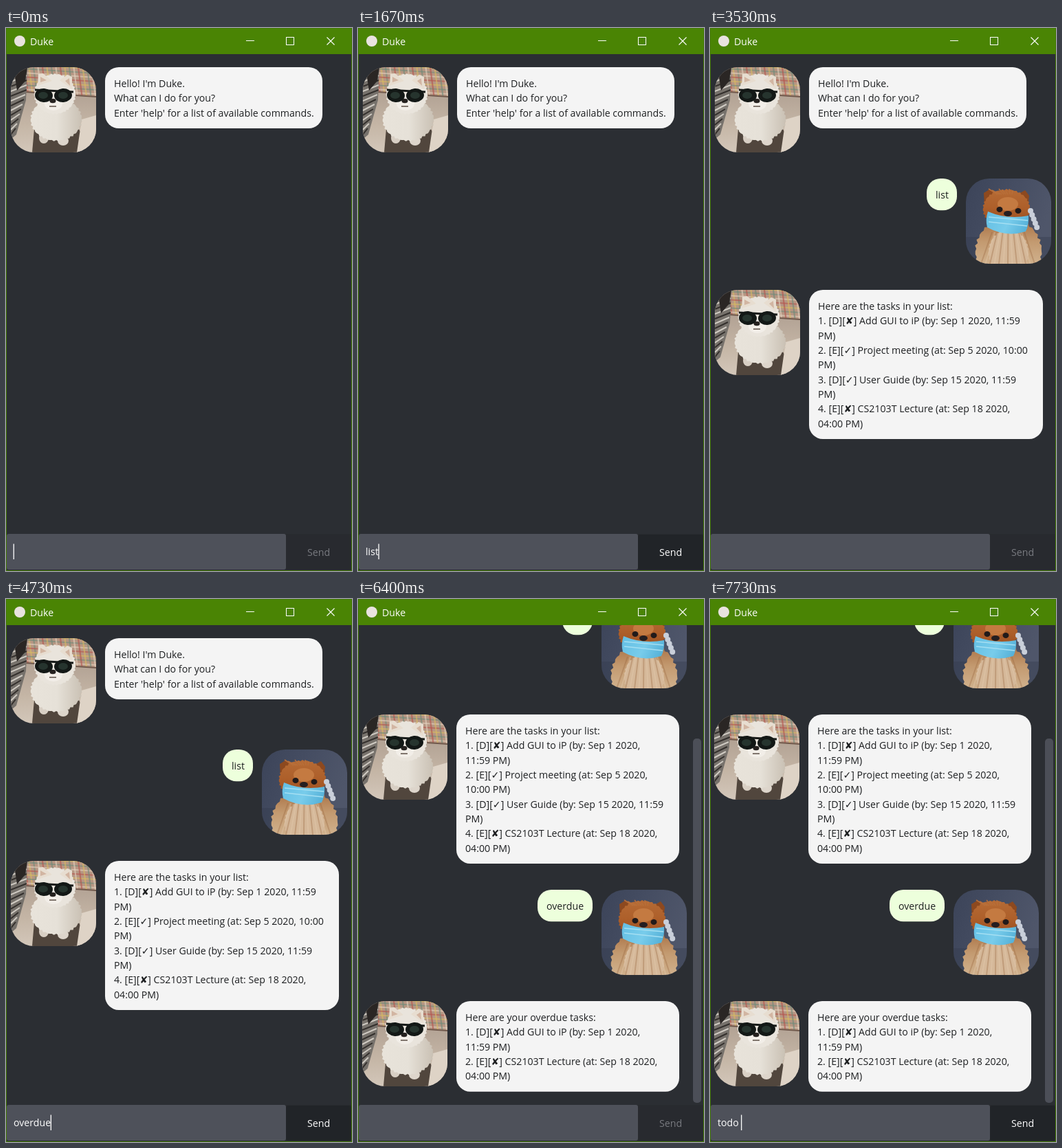
These frames come from a looping animation (503x790 px, 8000 ms). An HTML page with a canvas:

```html
<!DOCTYPE html>
<html lang="en">
<head>
<meta charset="utf-8">
<title>Chat</title>
<style>
html, body { margin: 0; width: 100%; height: 100%; overflow: hidden; background: #2b2e33; }
canvas { display: block; }
</style>
</head>
<body>
<canvas id="stage" width="503" height="790"></canvas>
<script>
const ctx = document.getElementById('stage').getContext('2d');
const LOOP = 8000, LINE = 21.33, AVATAR = 124;
const FONT = '14.16px "Open Sans", "DejaVu Sans", "Noto Sans", sans-serif';

const HELLO = ["Hello! I'm Duke.", 'What can I do for you?', "Enter 'help' for a list of available commands."];
const TASKS = ['Here are the tasks in your list:',
  '1. [D][✘] Add GUI to iP (by: Sep 1 2020, 11:59 PM)',
  '2. [E][✓] Project meeting (at: Sep 5 2020, 10:00 PM)',
  '3. [D][✓] User Guide (by: Sep 15 2020, 11:59 PM)',
  '4. [E][✘] CS2103T Lecture (at: Sep 18 2020, 04:00 PM)'];
const LATE = ['Here are your overdue tasks:', TASKS[1], TASKS[4].replace('4.', '2.')];

// Split each line before the given tail word(s)
const wrap = (lines, tails) => lines.flatMap((s, i) => {
  const tail = tails[i];
  return tail ? [s.slice(0, -tail.length - 1), tail] : [s];
});
const TASKS_WIDE = wrap(TASKS, ['', 'PM)', 'PM)', 'PM)', '04:00 PM)']);
const TASKS_NARROW = wrap(TASKS, ['', '11:59 PM)', '10:00 PM)', 'PM)', '04:00 PM)']);
const LATE_NARROW = wrap(LATE, ['', '11:59 PM)', '04:00 PM)']);

// [time, typed text, caret visible]
const INPUT = [
  [0, '', 1], [470, '', 0], [1000, '', 1],
  [1400, 'l', 1], [1490, 'li', 1], [1580, 'lis', 1], [1670, 'list', 1],
  [2070, '', 1], [2530, '', 0], [3000, '', 1], [3530, '', 0],
  [3730, 'o', 1], [3930, 'ov', 1], [4130, 'ove', 1], [4200, 'over', 1],
  [4470, 'overd', 1], [4600, 'overdu', 1], [4730, 'overdue', 1],
  [4930, '', 1], [5470, '', 0], [5930, '', 1], [6400, '', 0],
  [6930, '', 1], [7030, 't', 1], [7130, 'to', 1],
  [7270, 'tod', 1], [7400, 'todo', 1], [7730, 'todo ', 1]
];

function rect(x, y, w, h, color) {
  ctx.fillStyle = color;
  ctx.fillRect(x, y, w, h);
}

function round(x, y, w, h, r, color) {
  ctx.beginPath();
  ctx.roundRect(x, y, w, h, r);
  if (color) { ctx.fillStyle = color; ctx.fill(); }
}

function oval(x, y, rx, ry, color, turn = 0) {
  ctx.fillStyle = color;
  ctx.beginPath();
  ctx.ellipse(x, y, rx, ry, turn, 0, 7);
  ctx.fill();
}

function poly(color, ...p) {
  ctx.fillStyle = color;
  ctx.beginPath();
  for (let i = 0; i < p.length; i += 2) ctx.lineTo(p[i], p[i + 1]);
  ctx.fill();
}

function line(color, width, ...p) {
  ctx.strokeStyle = color;
  ctx.lineWidth = width;
  ctx.beginPath();
  for (let i = 0; i < p.length; i += 4) {
    ctx.moveTo(p[i], p[i + 1]);
    ctx.lineTo(p[i + 2], p[i + 3]);
  }
  ctx.stroke();
}

// Oval with a ragged edge
function fur(x, y, rx, ry, color) {
  ctx.fillStyle = color;
  ctx.beginPath();
  for (let i = 0; i < 72; i++) {
    const a = i / 72 * Math.PI * 2, k = 1 + 0.035 * Math.sin(i * 2.7);
    ctx.lineTo(x + rx * k * Math.cos(a), y + ry * k * Math.sin(a));
  }
  ctx.fill();
}

function fade(x0, y0, x1, y1, ...colors) {
  const g = ctx.createLinearGradient(x0, y0, x1, y1);
  colors.forEach((c, i) => g.addColorStop(i / (colors.length - 1), c));
  return g;
}

function text(s, x, y, color) {
  ctx.fillStyle = color;
  ctx.fillText(s, x, Math.round(y));
}

function avatar(x, y, paint) {
  ctx.save();
  ctx.translate(x, y);
  round(0, 0, AVATAR, AVATAR, 34);
  ctx.clip();
  paint();
  ctx.restore();
}

function whiteDog() {
  rect(0, 0, 124, 124, fade(0, 40, 0, 124, '#b3a395', '#c4b5a5', '#d3c7ba'));
  // plaid cushion
  ctx.save();
  ctx.beginPath();
  ctx.moveTo(24, 0); ctx.lineTo(124, 0); ctx.lineTo(124, 43); ctx.lineTo(20, 36);
  ctx.clip();
  rect(0, 0, 124, 50, '#b69683');
  const tones = ['#b6524b99', '#d8bb6199', '#6f8b7a99', '#e3d2c099'];
  for (let i = 0; i < 18; i++) {
    const x = 20 + i * 6.5, y = i * 6 - 4;
    line(tones[i % 4], 2.2, x, 0, x + 6, 46);
    line(tones[(i + 1) % 4], 2, 18, y, 124, y + 7);
  }
  ctx.restore();
  line('#71594c', 2, 20, 36, 124, 43);
  // wicker chair
  poly('#77726c', 0, 0, 24, 0, 22, 48, 8, 98, 0, 105);
  for (let i = 0; i < 15; i++) {
    line(i % 2 ? '#d0cbc3' : '#332f2c', 2, 0, i * 7, 23 - Math.max(0, i - 6) * 2, i * 7 - 9);
  }
  poly('#2a2624', 4, 0, 24, 0, 21, 20, 9, 34);
  // cast shadow
  poly('#51463d', 34, 90, 92, 78, 104, 99, 98, 124, 31, 124);
  poly('#ded3c6', 103, 76, 124, 70, 124, 124, 96, 124);
  // body and head
  const coat = fade(30, 0, 104, 0, '#e8e3da', '#e6e1d8', '#c9c0b3');
  oval(48, 103, 7, 8, '#d8cfc4');
  oval(76, 107, 8, 7, '#ddd5cb');
  fur(66, 76, 37, 31, coat);
  fur(64, 39, 30, 29, '#e9e4dc');
  poly('#e7ddd0', 39, 27, 40, 10, 47, 9, 60, 20);
  poly('#e7ddd0', 71, 19, 82, 11, 89, 14, 89, 32);
  poly('#d2b5a2', 43, 22, 43, 14, 52, 19);
  poly('#d2b5a2', 79, 20, 85, 16, 86, 27);
  oval(62, 53, 13, 10, '#f2eee8');
  oval(61, 49, 4.5, 3.2, '#25211f');
  line('#5a4c45', 1.4, 56, 57, 66, 57);
  // sunglasses
  line('#161917', 3, 35, 33, 91, 36);
  oval(48, 41, 13, 10, '#131816', 0.08);
  oval(76, 41, 13, 10, '#131816', -0.08);
  oval(47, 41, 7, 5, '#26342e');
  oval(76, 41, 7, 5, '#26342e');
}

function maskedDog() {
  rect(0, 0, 124, 124, fade(0, 0, 124, 40, '#3c4459', '#454d62', '#4f566a'));
  rect(0, 85, 124, 39, '#343b4d66');
  // chest
  fur(62, 106, 48, 48, fade(0, 60, 0, 124, '#a97043', '#c39a70', '#d0b18d'));
  fur(62, 108, 29, 34, '#d5b899');
  for (let i = 0; i < 13; i++) {
    const x = 22 + i * 6.5;
    line(i % 2 ? '#e5cdb055' : '#97643c55', 2, 62 + (x - 62) * 0.6, 78, x, 124);
  }
  // head
  poly('#8d491f', 27, 40, 26, 21, 34, 16, 52, 28);
  poly('#8d491f', 72, 25, 86, 17, 92, 25, 90, 42);
  fur(59, 44, 34, 28, fade(0, 15, 0, 70, '#b66b35', '#ad5f2a', '#974b20'));
  for (let i = 0; i < 8; i++) line('#b86f39', 1.5, 46 + i * 3, 23, 33 + i * 5, 15 + i % 3 * 2);
  oval(61, 37, 15, 10, '#c47a41');
  oval(49, 45, 4.5, 4, '#211a1a');
  oval(76, 47, 4.5, 4, '#211a1a');
  oval(61, 51, 6, 4, '#251e20');
  // mask
  for (let i = 0; i < 5; i++) oval(94 + i * 2.3, 47 + i * 6, 4, 4, '#c9cfda');
  ctx.fillStyle = fade(30, 50, 92, 80, '#64bfe4', '#78cceb', '#4eabd4');
  ctx.beginPath();
  ctx.moveTo(32, 48);
  ctx.quadraticCurveTo(60, 60, 91, 54);
  ctx.quadraticCurveTo(92, 67, 87, 77);
  ctx.quadraticCurveTo(58, 86, 31, 71);
  ctx.quadraticCurveTo(28, 60, 32, 48);
  ctx.fill();
  line('#a5dff2', 1.3, 33, 56, 90, 61, 33, 63, 89, 69);
}

function bubble(x, y, w, lines, color = '#f4f4f4') {
  round(x, y, w, 46.33 + (lines.length - 1) * LINE, 20, color);
  lines.forEach((s, i) => text(s, x + 13, y + 29 + i * LINE, '#1d1f21'));
}

function bot(x, y, w, lines) {
  avatar(x, y, whiteDog);
  bubble(x + 137, y, w, lines);
}

function user(x, y, w, s) {
  avatar(x, y, maskedDog);
  bubble(x - 13 - w, y, w, [s], '#edffdc');
}

function chat(t) {
  if (t < 4930) {
    bot(7, 57, 316, HELLO);
    if (t < 2070) return;
    user(372, 219, 44, 'list');
    bot(7, 381, 340, TASKS_WIDE);
  } else {
    user(354, 6, 44, 'list');
    bot(6, 168, 324, TASKS_NARROW);
    user(354, 423, 80, 'overdue');
    bot(6, 585, 324, LATE_NARROW);
    round(487, 203, 12, 530, 5, '#4c4f58');
  }
}

function titleBar() {
  rect(0, 0, 503, 38, '#4a8404');
  oval(20, 19, 8, 8, '#e9e3df');
  text('Duke', 35, 25, '#fff');
  line('#fff', 1, 349, 18.5, 361, 18.5);
  ctx.strokeRect(407.5, 13.5, 11, 11);
  line('#fff', 1.1, 466.5, 13.5, 477.5, 24.5, 477.5, 13.5, 466.5, 24.5);
}

function inputBar(t) {
  const [, typed, caret] = INPUT.findLast(step => step[0] <= t);
  rect(0, 736, 503, 54, '#282b2f');
  round(407, 737, 95, 51, 3, typed ? '#212428' : '#282a2f');
  round(1, 736, 406, 52, 3, '#4e515a');
  text(typed, 11, 767, '#fff');
  text('Send', 438, 768, typed ? '#fff' : '#797b80');
  if (caret) rect(10.6 + ctx.measureText(typed).width, 750.5, 1.3, 22.5, '#fff');
}

function draw(t) {
  ctx.font = FONT;
  rect(0, 0, 503, 790, '#2b2e33');
  chat(t);
  titleBar();
  inputBar(t);
  ctx.strokeStyle = '#447a08';
  ctx.lineWidth = 1;
  ctx.strokeRect(0.5, 0.5, 502, 789);
}

const start = performance.now();
function tick() {
  draw((performance.now() - start) % LOOP);
  requestAnimationFrame(tick);
}
tick();
</script>
</body>
</html>
```
